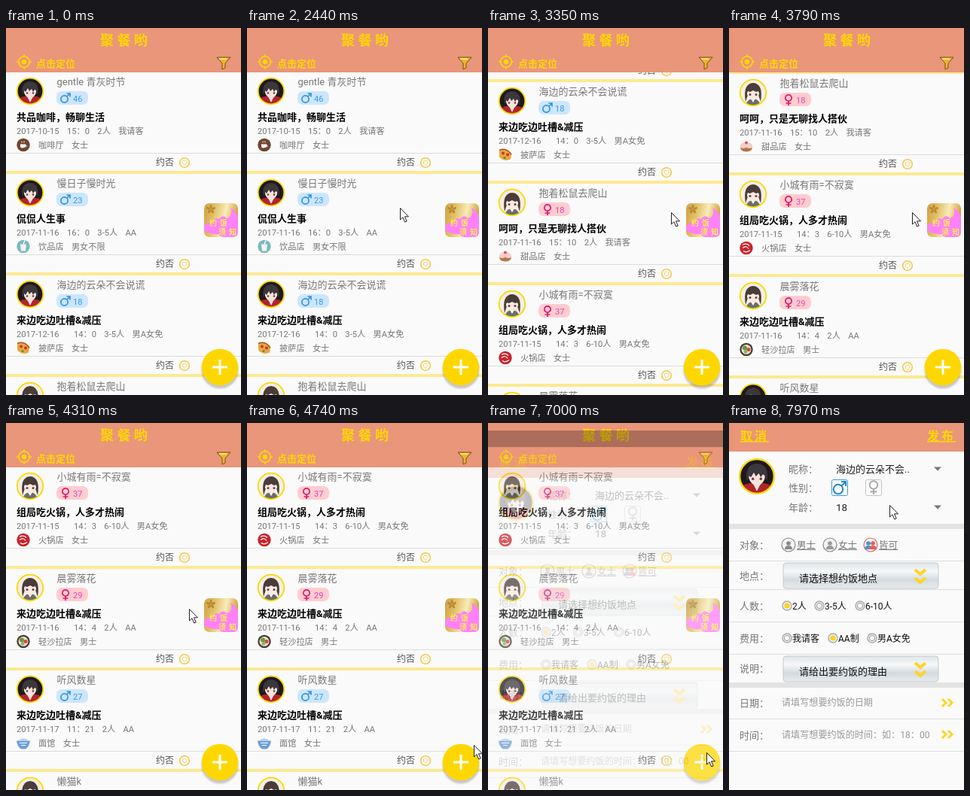
These frames come from a looping animation (312 px wide and 488 px high, 8000 ms). An HTML page:

```html
<!DOCTYPE html>
<html lang="zh">
<head>
<meta charset="utf-8">
<style>
html, body { margin: 0; width: 100%; height: 100%; overflow: hidden; background: #fafafa; }
svg { display: block; font-family: Roboto, "Noto Sans CJK SC", "Noto Sans CJK", sans-serif; }
</style>
</head>
<body>
<svg id="stage" width="312" height="488" viewBox="0 0 312 488"></svg>
<script>
const GOLD = '#ffd700', SALMON = '#e9967a', GREY = '#777';
const stage = document.getElementById('stage');

// Drawing helpers: text is placed by its left edge and vertical centre
const text = (x, cy, s, size, fill, extra = '') =>
  `<text x="${x}" y="${cy + size * .37}" font-size="${size}" fill="${fill}" ${extra}>${s}</text>`;
const rect = (x, y, w, h, fill, extra = '') =>
  `<rect x="${x}" y="${y}" width="${w}" height="${h}" fill="${fill}" ${extra}/>`;
const circle = (x, y, r, fill, extra = '') =>
  `<circle cx="${x}" cy="${y}" r="${r}" fill="${fill}" ${extra}/>`;
const path = (d, fill, extra = '') => `<path d="${d}" fill="${fill}" ${extra}/>`;
const line = (d, color, w = 1) => path(d, 'none', `stroke="${color}" stroke-width="${w}"`);
const group = (x, y, body, scale = 1) =>
  `<g transform="translate(${x} ${y}) scale(${scale})">${body}</g>`;
const spaced = s => s.split('|').map((p, i) => `<tspan dx="${i ? 10.3 : 0}">${p}</tspan>`).join('');

const male = (c, w) => circle(-1.5, 1.5, 4.6, 'none', `stroke="${c}" stroke-width="${w}"`) +
  line('M2 -2L6 -6M1.5 -6H6V-1.5', c, w);
const female = (c, w) => circle(0, -2, 4.2, 'none', `stroke="${c}" stroke-width="${w}"`) +
  line('M0 2V8M-3.5 5H3.5', c, w);

const boy = circle(0, 0, 17, '#1d191b') +
  path('M-14 9Q-9 6 0 7Q9 6 14 9Q8 17 0 17Q-8 17-14 9Z', '#b2242c') +
  path('M-4 7L0 15L4 7Z', '#e9e2e0') +
  path('M-8 -5V2Q-6 8 0 10Q6 8 8 2V-5Z', '#f6e4dc') +
  path('M-10 5Q-13 -12 0 -13Q13 -12 10 5L8 -1L6 -2L4 1L2 -3L-1 0L-3 -4L-6 1L-8 -1Z', '#3b373b') +
  circle(-4, 2.5, 1.3, '#7c3034') + circle(4, 2.5, 1.3, '#7c3034');
const girl = circle(0, 0, 17, '#f3efe6') +
  path('M-10 12Q-14 -12 0 -13Q14 -12 10 12L7 3H-7Z', '#4a3d39') +
  path('M-9 14Q-6 8 0 8Q6 8 9 14Q4 17 0 17Q-4 17-9 14Z', '#687069') +
  path('M-3 8L0 13L3 8Z', '#fff') +
  path('M-8 -4V2Q-6 8 0 10Q6 8 8 2V-4Z', '#fce8de') +
  path('M-9 3Q-10 -9 0 -10Q10 -9 9 3L7 -2L4 -1L0 -3L-4 -1L-7 -2Z', '#4a3d39') +
  circle(-4, 2.5, 1.5, '#5a4444') + circle(4, 2.5, 1.5, '#5a4444');
const ring = circle(0, 0, 17.3, 'none', `stroke="${GOLD}" stroke-width="1.8"`);
const avatar = isMale => (isMale ? boy : girl) + ring;

const foods = {
  coffee: circle(0, 0, 8.7, '#70452f') + path('M-4 -1H3V2Q2 4-1 4Q-4 4-4 2Z', '#fff') +
    line('M3 0Q6 1 3 3M-2 -5V-3M1 -5V-3', '#fff'),
  drink: circle(0, 0, 8.7, '#7db9c0') + path('M-4 -3H4L3 6H-3Z', '#f2f4f0') + line('M0 -3L2 -8', '#fff', 1.3),
  pizza: path('M-8 -6Q2 -10 8 0L7 6Q-1 10-8 3Z', '#eba640') + circle(-3, -2, 2, '#c6382c') +
    circle(3, 0, 2, '#c6382c') + circle(-1, 4, 1.6, '#5d8a3a') + line('M-8 -6Q2 -10 8 0', '#9c5a22', 1.5),
  cake: path('M-8 0Q-8 7 0 7Q8 7 8 0Z', '#b5764e') + path('M-8 1Q-9 -5 0 -6Q9 -5 8 1Q4 4 0 1Q-4 4-8 1Z', '#f5cfc9') +
    circle(0, -5, 2, '#e0525a'),
  hotpot: circle(0, 0, 8.7, '#c8242b') + line('M-5 -4Q0 -7 4 -3M-5 0Q0 -4 3 1M-4 4Q0 7 5 3', '#fff', 1.2),
  salad: circle(0, 0, 8.7, '#4a3b33') + circle(0, 0, 6.5, '#e9e2cf') + circle(-2, -2, 3, '#5e9b48') +
    circle(3, 0, 2.5, '#d4483c') + circle(-1, 3, 2.3, '#7fb85a'),
  noodle: path('M-9 -3H9Q8 5 3 8H-3Q-8 5-9 -3Z', '#6f9fd8') + path('M-7 -3Q0 -9 7 -3Z', '#b9cfea') +
    line('M-5 0H5M-3 3H3', '#fff')
};

const people = [
  ['gentle 青灰时节', 1, 46, '共品咖啡，畅聊生活', '2017-10-15|15：0|2人|我请客', 'coffee', '咖啡厅|女士'],
  ['慢日子慢时光', 1, 23, '侃侃人生事', '2017-11-16|16：0|3-5人|AA', 'drink', '饮品店|男女不限'],
  ['海边的云朵不会说谎', 1, 18, '来边吃边吐槽&amp;减压', '2017-12-16||14：0|3-5人|男A女免', 'pizza', '披萨店|女士'],
  ['抱着松鼠去爬山', 0, 18, '呵呵，只是无聊找人搭伙', '2017-11-16|15：10|2人|我请客', 'cake', '甜品店|女士'],
  ['小城有雨=不寂寞', 0, 37, '组局吃火锅，人多才热闹', '2017-11-15||14：3|6-10人|男A女免', 'hotpot', '火锅店|女士'],
  ['晨雾落花', 0, 29, '来边吃边吐槽&amp;减压', '2017-11-16||14：4|2人|AA', 'salad', '轻沙拉店|男士'],
  ['听风数星', 1, 27, '来边吃边吐槽&amp;减压', '2017-11-17|11：21|2人|AA', 'noodle', '面馆|女士'],
  ['懒猫k', 0, 25, '共品咖啡，畅聊生活', '2017-11-18|12：0|2人|AA', 'coffee', '咖啡厅|女士']
];

// An empty part widens the gap after the day
const dateRow = s => {
  const wide = s.includes('||');
  const [day, ...rest] = s.replace('||', '|').split('|');
  return text(14, 78, day, 11.2, GREY) + text(wide ? 90 : 81, 78, spaced(rest.join('|')), 11.2, GREY);
};

const card = ([name, isMale, age, title, date, food, place], i) => group(0, 59 + i * 135,
  group(32, 25, avatar(isMale)) +
  text(67.5, 12, name, 13, GREY) +
  rect(67, 25, 42, 18, isMale ? '#cce6ff' : '#ffcccf', 'rx="7"') +
  group(79, 34, isMale ? male('#2f94dc', 1.7) : female('#d81b72', 1.7)) +
  text(89, 34.5, age, 11, isMale ? '#3598ea' : '#e544b4') +
  text(14, 59, title, 13, '#000', 'font-weight="bold"') +
  dateRow(date) +
  group(23, 96.5, foods[food]) +
  text(43, 96.5, spaced(place), 11.2, GREY) +
  rect(0, 107, 312, 1, '#dcdcdc') +
  text(199, 120, '约否', 12, '#555') +
  circle(237, 120, 6.3, '#fff', 'stroke="#f3c64f" stroke-width="1.6"') +
  path('M234 118Q237 116 240.5 118Q240.5 122 237 123.5Q234 122 234 118Z', '#fffdf2', 'stroke="#f3cd6a" stroke-width=".9"') +
  rect(0, 131, 312, 4, '#fde991'));

const header = rect(0, 0, 312, 59, SALMON) +
  text(156.5, 16, '聚 餐 哟', 18, GOLD, 'font-weight="bold" text-anchor="middle"') +
  circle(24, 45, 7.3, 'none', `stroke="${GOLD}" stroke-width="1.6"`) + circle(24, 45, 3.2, GOLD) +
  line('M24 35V39M24 51V55M14 45H18M30 45H34', GOLD, 1.6) +
  text(40, 47, '点击定位', 13, GOLD, 'font-weight="bold"') +
  path('M280 39H298L291 47V53L287 55V47Z', '#f0b429', 'stroke="#75501c" stroke-linejoin="round"') +
  line('M283 41H293', '#fff0a0', 1.5);

const noticeText = (x, y, s) => text(x, y, s, 10, '#fff04a', 'font-weight="bold" letter-spacing=".8"');
const notice = group(263, 233, rect(0, 0, 45, 45, 'url(#brass)', 'rx="7"') +
  path('M0 31Q5 23 11 27Q14 18 20 21Q25 14 30 20Q39 17 35 6Q45 11 45 22V38Q45 45 38 45H27Q21 45 19 41Q8 42 0 36Z', '#ff80fb') +
  [0, 72, 144, 216, 288].map(a => `<ellipse cx="9" cy="4.5" rx="1.6" ry="2.8" fill="#b98a2e" transform="rotate(${a} 9 8)"/>`).join('') +
  noticeText(7, 26, '约 饭') + noticeText(19, 38, '须 知'));

const fab = `<circle id="shade" cx="284" r="24.5" fill="#000" opacity=".2" filter="url(#blur)"/>` +
  circle(284, 451, 24.3, GOLD) + circle(284, 451, 0, '#fff', 'id="ripple"') + line('M284 441V461M274 451H294', '#fff', 3);

// Form page
const label = (x, cy, s) => text(x, cy, s + '：', 13, GREY);
const rule = y => rect(0, y, 312, 1, '#dedede');
const band = y => rect(0, y, 312, 7, '#e3e3e3');
const drop = y => path(`M272 ${y - 2.5}h10l-5 5Z`, GREY);
const link = (x, s) => text(x, 17, s, 16, GOLD, 'font-weight="bold" letter-spacing="3" text-decoration="underline"');
const chevrons = 'M-7 -11L0 -5L7 -11M-7 0L0 6L7 0';
const picker = (y, s) => rect(72, y, 206, 34, 'url(#steel)', 'rx="4" stroke="#c3cbd0"') +
  text(93, y + 20, s, 13, '#111') + group(254, y + 20, line(chevrons, '#ffd42a', 4.2));
const more = y => line(`M283 ${y - 5}l5 5l-5 5M291 ${y - 5}l5 5l-5 5`, '#ffd42a', 3);
const radio = (x, y, s, on) => circle(x, y, 6, '#eee', 'stroke="#aaa" stroke-width="1.4"') +
  circle(x, y, 3.6, on ? '#ffd21c' : '#fafafa', on ? '' : 'stroke="#999"') + text(x + 7, y + .5, s, 12, '#111');
const bust = (x, c) => circle(x, 160, 2.8, c) + path(`M${x - 5} 168q0 -5 5 -5t5 5Z`, c);
const who = (x, s, edge, body) => circle(x, 162, 9, '#f3f3f3', `stroke="${edge}" stroke-width="1.2"`) + body +
  text(x + 11, 162, s, 12.5, GREY, 'text-decoration="underline" font-weight="500"');

const form = rect(0, -25, 312, 22, '#000') + rect(0, -3, 312, 500, '#fafafa') + rect(0, -3, 312, 41, SALMON) +
  link(15, '取消') + link(263, '发布') +
  group(37, 71, avatar(1), 1.32) +
  label(79, 61, '昵称') + text(142, 61, '海边的云朵不会..', 13, '#222') + drop(61) +
  label(79, 86, '性别') +
  rect(136.5, 75.5, 21, 21, '#fff', 'rx="2" stroke="#3a9be0"') + group(147, 86, male('#1f86c9', 1.5), 1.35) +
  rect(181.5, 75.5, 21, 21, '#fafafa', 'rx="2" stroke="#c4c4c4"') + group(192, 85, female('#aaa', 1.5), 1.25) +
  label(79, 112, '年龄') + text(142, 112, '18', 13.5, '#222') + drop(112) +
  band(134) + label(14, 162, '对象') +
  who(79, '男士', '#888', bust(79, '#888')) + who(134, '女士', '#888', bust(134, '#999')) +
  who(188, '皆可', '#e0605c', bust(185, '#4b93cf') + bust(191, '#e0605c')) +
  rule(183) + label(14, 203, '地点') + picker(186, '请选择想约饭地点') +
  rule(221) + label(14, 243, '人数') + radio(77, 243, '2人', 1) + radio(120, 243, '3-5人') + radio(174, 243, '6-10人') +
  rule(264) + label(14, 286, '费用') + radio(77, 286, '我请客') + radio(138, 286, 'AA制', 1) + radio(190, 286, '男A女免') +
  rule(307) + label(14, 326, '说明') + picker(310, '请给出要约饭的理由') +
  band(345) + label(14, 372, '日期') + text(70, 372, '请填写想要约饭的日期', 12.1, '#999') + more(372) +
  rule(393) + label(14, 415, '时间') + text(70, 415, '请填写想要约饭的时间：如：18：00', 12.1, '#999') + more(414) +
  rule(436);

const gradient = (id, dir, colors) => `<linearGradient id="${id}" ${dir}>` +
  colors.map((c, i) => `<stop offset="${i / (colors.length - 1)}" stop-color="${c}"/>`).join('') + '</linearGradient>';

stage.innerHTML = '<defs>' +
  gradient('brass', 'x2="1" y2="0.2"', ['#cfa144', '#e2c069', '#f8ecb9', '#d2a544']) +
  gradient('steel', 'x2="0" y2="1"', ['#dfe5e8', '#f6f8f9', '#d3dade', '#e8ecee']) +
  '<filter id="blur"><feGaussianBlur stdDeviation="1.3"/></filter></defs>' +
  rect(0, 0, 312, 488, '#fafafa') +
  `<g id="list">${people.map(card).join('')}</g>` + header + notice + fab +
  `<g id="form">${form}</g>` +
  `<g id="cursor">${path('M0.5 0.5V16L4 12.7L6.7 19L9.2 18L6.5 11.8H11.5Z', '#fff', 'stroke="#222"')}</g>`;

// Tracks: [time, values...], each held until the next entry
const scrolls = [[0, 0], [2560, 22], [2690, 62], [2810, 110], [3080, 160], [3200, 208], [3350, 257],
  [3490, 308], [3640, 358], [3790, 403], [4040, 480], [4160, 540]];
const moves = [[0, 400, 400], [560, 303, 369], [710, 250, 295], [830, 203, 239], [2810, 243, 245],
  [4310, 243, 247], [4460, 245, 249], [4610, 270, 330], [4740, 301, 428], [4860, 298, 434], [5000, 290, 438],
  [7570, 273, 376], [7720, 252, 265], [7840, 228, 165], [7970, 213, 109]];
const ripples = [[0, 0, 0], [5250, 11, .3], [5520, 19, .3], [5820, 24, .28], [5940, 24, .15], [6200, 0, 0]];
const shades = [[0, 455], [5250, 457], [6720, 455]];
const pages = [[0, 0, 0], [7000, 35, .26], [7140, 2, .95], [7300, 0, 1]];
const at = (track, t) => track.findLast(k => k[0] <= t).slice(1);

const set = (id, attrs) => {
  for (const k in attrs) document.getElementById(id).setAttribute(k, attrs[k]);
};
let start;
function draw(now) {
  start ??= now;
  const t = (now - start) % 8000;
  const [x, y] = at(moves, t), [r, glow] = at(ripples, t), [shift, alpha] = at(pages, t);
  set('list', { transform: `translate(0 ${-at(scrolls, t)[0]})` });
  set('cursor', { transform: `translate(${x} ${y})` });
  set('ripple', { r, opacity: glow });
  set('shade', { cy: at(shades, t)[0] });
  set('form', { transform: `translate(0 ${shift})`, opacity: alpha });
  requestAnimationFrame(draw);
}
requestAnimationFrame(draw);
</script>
</body>
</html>
```
